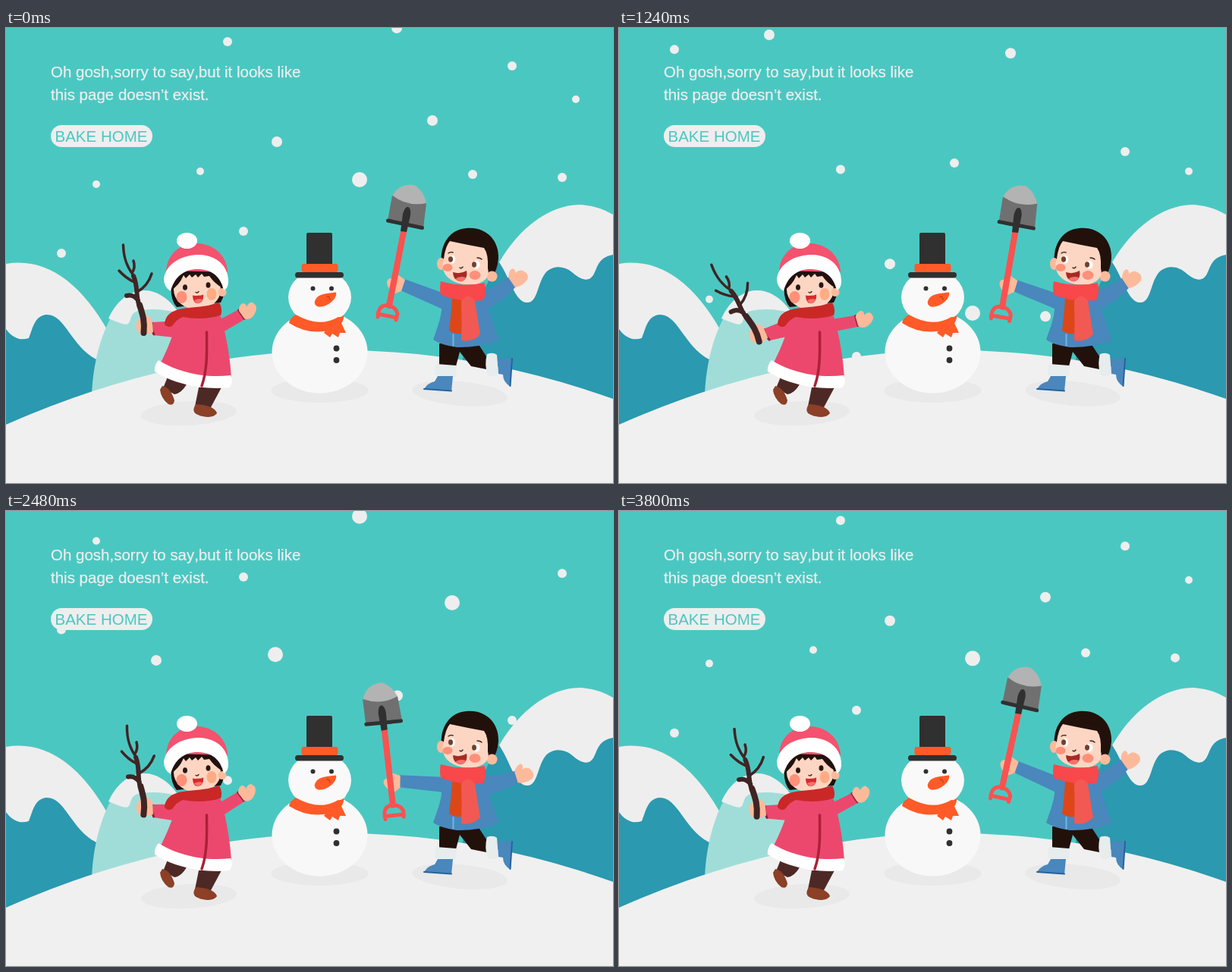
Animation, 800 px wide and 600 px high, one loop 3840 ms. Source, as an HTML page:

```html
<!DOCTYPE html>
<html lang="en">
<head>
<meta charset="utf-8">
<title>Page not found</title>
<style>
html, body { margin: 0; width: 100%; height: 100%; overflow: hidden; background: #4bc7c1; }
svg { display: block; }
text { font: 20.5px "Liberation Sans", Arial, sans-serif; font-kerning: none; fill: #eee; stroke: #eee; stroke-width: .25; }
.line { fill: none; stroke-linecap: round; stroke-linejoin: round; }
.blue { fill: #4987bd; }
.skin { fill: #fdba9b; }
.snow { fill: #eee; }
.coat { fill: #ec486d; }
.dark { fill: #303030; }
.orange { fill: #ff5a27; }
</style>
</head>
<body>
<svg width="800" height="600" viewBox="0 0 800 600">
  <rect width="800" height="600" fill="#4bc7c1"/>
  <g id="flakes" class="snow"></g>

  <g id="hills">
    <path fill="#2b99af" d="M0 385L60 370L119 437V500L0 530ZM650 308L700 300L800 290V500H590Q610 370 650 308Z"/>
    <path class="snow" d="M0 311C52 302 98 335 134 399L119 437C86 420 78 378 54 378C38 379 36 394 30 409C18 413 8 408 0 397Z"/>
    <path class="snow" d="M650 309C677 262 718 233 756 233Q780 234 800 246V299C780 303 780 315 775 324C768 338 755 330 746 322C735 313 720 313 711 323C700 337 701 362 687 362C671 362 665 331 650 309Z"/>
    <path fill="#a0ddd9" d="M113 485C115 415 145 346 182 346C222 346 246 415 251 485Z"/>
    <path class="snow" d="M135 383C146 359 164 346 182 346C200 346 216 358 228 376C208 370 187 370 174 373C161 377 167 388 159 391Q151 390 135 383Z"/>
  </g>
  <path fill="#f0f0f0" d="M0 523Q400 346 800 489V600H0Z"/>
  <g fill="#e9e9e9">
    <ellipse cx="241" cy="508" rx="63" ry="16" transform="rotate(-3 241 508)"/>
    <ellipse cx="413.500" cy="478" rx="64" ry="16"/>
    <ellipse cx="598" cy="482" rx="63" ry="16" transform="rotate(5 598 482)"/>
  </g>

  <g id="snowman">
    <ellipse cx="413.500" cy="427.500" rx="63" ry="54" fill="#f8f8f8"/>
    <ellipse cx="413.500" cy="355" rx="41.500" ry="36" fill="#f9f9f9"/>
    <g class="dark">
      <rect x="396" y="270" width="34" height="45" rx="2"/>
      <rect x="381" y="322" width="64" height="7.500" rx="3.700"/>
      <circle cx="404.500" cy="343.500" r="3"/><circle cx="429" cy="343.500" r="3"/>
      <circle cx="435.500" cy="422.500" r="3.900"/><circle cx="435.500" cy="438" r="3.900"/>
    </g>
    <g class="orange">
      <rect x="389.500" y="311" width="48" height="11" rx="3"/>
      <path d="M408 358C412 350 425 350 435 348.500C437 358 422 369 411 367.500C406 365 406 361 408 358Z"/>
      <path d="M382 378Q373 384 373 389Q401 407 432 397Q446 390 445 379Q440 382 438 381Q413 396 382 378Z"/>
      <path d="M427 391L441 387L448 402L440 402L438 408L430 403L427 408L419 402Z"/>
    </g>
    <path class="line" stroke="#c9431c" stroke-width="1.600" d="M423 354Q427 354 427 358"/>
  </g>

  <g id="girl">
    <path fill="#4d2925" d="M213 460L238 470Q231 482 222 483L207 475ZM254 474H284L269 502L249 499Z"/>
    <path fill="#8b4027" d="M206 472Q217 474 222 491Q221 499 214 496Q204 488 203 477ZM251 496Q275 498 278 508Q273 515 259 512Q243 509 249 498Z"/>
    <g id="branchArm">
      <path class="coat" d="M230 386L192 388Q190 397 194 405L230 409Z"/>
      <path class="line" stroke="#952039" stroke-width="3" d="M192.500 389Q191 397 195 404"/>
      <path class="skin" d="M193 387Q190 380 185 379Q178 380 172 388Q170 396 175 402Q186 406 194 401Z"/>
      <g class="line" stroke="#402424">
        <path stroke-width="3.500" d="M154.500 286C155 305 160 316 168 326M149 320Q158 330 169 335M168 307Q171 316 166 323M192 324Q187 340 173 348"/>
        <path stroke-width="6" d="M168 327C174 340 171 353 175 364M159 353Q168 351 174 359"/>
        <path stroke-width="8" d="M176 365C180 378 183 385 181.500 402"/>
      </g>
    </g>
    <g id="waveArm">
      <path class="coat" d="M279 386L307 371L315 384L286 401Z"/>
      <path class="line" stroke="#952039" stroke-width="3" d="M306.500 372Q311 379 314 383"/>
      <path class="skin" d="M307 373C307 366 311 361 315 364Q317 365 317 368C320 361 325 361 326 363Q332 366 329 374C326 382 320 386 314 383Z"/>
    </g>
    <path class="coat" d="M226 380H283C291 408 296 438 297 464L250 469L200 449C212 426 222 403 226 380Z"/>
    <path fill="#fff" d="M201 438C226 454 262 462 296 458Q300 466 295 474C262 478 222 470 196 453Q195 445 201 438Z"/>
    <path class="line" stroke="#ad2038" stroke-width="3.500" d="M264.500 401C265 430 265 452 258 472"/>
    <path fill="#21110f" d="M218 338Q216 358 225 368L283 362Q290 350 289 326L250 310Z"/>
    <ellipse cx="252" cy="345" rx="31" ry="26" fill="#fdd6c3"/>
    <circle cx="285" cy="348.500" r="5.500" class="skin"/>
    <path fill="#21110f" d="M217 346Q228 340 234 326L237 330L242 325L245 329L250 325L253 329L258 324L261 328L268 327Q274 336 284 342L290 330V312H217Z"/>
    <ellipse cx="231.500" cy="355" rx="7" ry="8" fill="#ff9079"/>
    <ellipse cx="271" cy="351" rx="6.500" ry="8" fill="#ffac85"/>
    <g fill="#2a1714"><ellipse cx="236" cy="342" rx="3" ry="3.800"/><ellipse cx="266.500" cy="339" rx="3" ry="3.800"/></g>
    <path class="line" stroke="#3c211b" stroke-width="1.300" d="M250 348.500Q252 350 254 347.500"/>
    <path fill="#d62b2b" d="M246 352.500Q253 354 260 351.500C261 360 256 364 251 363Q246 361 246 352.500Z"/>
    <path fill="#f4716d" d="M248 359Q254 356 259 358Q256 364 251 363Z"/>
    <path fill="#f4526e" d="M211 320C213 298 228 284 253 284C276 286 291 301 292 322Z"/>
    <ellipse cx="238.500" cy="280.500" rx="13.500" ry="10.500" fill="#fff"/>
    <path fill="#fff" d="M217 347Q208 342 208 330C212 309 233 299 255 299C280 300 294 316 293 336Q292 344 287 346C283 327 270 318 252 318C235 318 222 328 217 347Z"/>
    <path fill="#ca2727" d="M209 391C210 377 220 371 240 369Q263 368 281 362Q286 370 283 379Q258 386 233 381Q225 384 219 393Q213 396 209 391Z"/>
  </g>

  <g id="boy">
    <g id="shovelArm">
      <path class="blue" d="M525 331L583 352L576 371L520 346Z"/>
      <path class="skin" d="M526 332L516 325Q511 325 510 330Q502 329 502 336Q503 345 513 350L521 347Z"/>
      <path class="line" stroke="#fa5250" stroke-width="8" stroke-linecap="butt" d="M525 264L505 366"/>
      <path class="line" stroke="#fa5250" stroke-width="5" d="M490 381L491 374Q494 364 504 366Q514 368 516 377L514 385M490 377L515 382"/>
      <path fill="#707070" d="M509 221L554 231L550 264L503 254Z"/>
      <path fill="#b3b3b3" d="M509.500 221C517 207 530 205 540 208Q551 216 554 231Q529 236 509.500 221Z"/>
      <path class="dark" d="M520 268L523 245Q526 235 530 236Q534 238 533 247L528 269Z"/>
      <path class="line" stroke="#303030" stroke-width="5" d="M503.500 254L548.500 263.500"/>
    </g>
    <g id="freeArm">
      <path class="blue" d="M623 348Q646 342 663 328L672 341Q658 358 634 371Z"/>
      <path class="skin" d="M662 329Q663 318 668 317Q672 319 671 323Q678 317 683 321Q690 325 687 332Q680 341 671 342Z"/>
    </g>
    <path fill="#22110b" d="M571 416H622L633 433V450L613 446L598 427L593 446H571Z"/>
    <path fill="#e7eced" d="M567 443L593 445Q595 452 592 460L566 458Q564 450 567 443ZM634 430Q642 427 647 431L649 456Q642 461 635 458Q630 444 634 430Z"/>
    <path class="blue" d="M569 459H589L587 479L551 476Q556 468 565 466ZM648 436L667 435L665 473Q655 467 655 457L649 456Z"/>
    <path class="line" stroke="#28639b" stroke-width="2" d="M551 476L587 478.500M667 436L664.500 472"/>
    <path class="blue" d="M574 350H631C636 375 643 394 650 412Q620 422 594 421Q573 418 563 411C570 391 577 375 574 350Z"/>
    <path fill="#dd4718" d="M588 356H604L601 403Q590 404 584 399Q587 375 588 356Z"/>
    <path class="line" stroke="#75b5e0" stroke-width="2" d="M589.500 404V419"/>
    <path fill="#22110b" d="M574 312C571 284 586 265 607 264C634 262 650 281 649 304Q648 318 640 330L586 322Z"/>
    <ellipse cx="573.500" cy="311" rx="5.500" ry="8" class="skin"/>
    <circle cx="640.500" cy="327.500" r="7" class="skin"/>
    <path fill="#fdd6c3" d="M577 304Q579 288 585 281Q608 286 630 290Q636 298 635 317Q639 332 620 338Q591 341 579 325Q573 316 577 304Z"/>
    <g fill="#fff"><ellipse cx="588" cy="305" rx="4" ry="5.500"/><ellipse cx="620" cy="312" rx="4.500" ry="5.500"/></g>
    <g fill="#704030"><ellipse cx="586" cy="305" rx="3" ry="3.700"/><ellipse cx="617" cy="312" rx="3" ry="3.700"/></g>
    <g fill="#ff9079"><ellipse cx="582" cy="316" rx="6.500" ry="5"/><ellipse cx="618" cy="326" rx="7.500" ry="6"/></g>
    <path class="line" stroke="#3c211b" stroke-width="1.400" d="M583 297Q586 295 589 296M621 303Q625 303 627 305M598 316Q600 318 602 315"/>
    <path fill="#a52b24" d="M589 322Q599 325 607 320C609 329 604 335 597 334Q589 331 589 322Z"/>
    <path fill="#f4716d" d="M592 331Q598 326 606 329Q603 336 597 334Z"/>
    <path fill="#f8484b" d="M573 334Q601 342 631 336Q634 349 629 359Q598 362 573 352Q571 342 573 334Z"/>
    <path fill="#f25953" d="M600 360Q609 347 618 360L625 404Q615 415 600 412Q601 385 600 360Z"/>
  </g>

  <text x="59" y="65">Oh gosh,sorry to say,but it looks like</text>
  <text x="59" y="95">this page doesn’t exist.</text>
  <rect class="snow" x="59" y="128" width="134" height="29" rx="14.500"/>
  <text x="64.500" y="150" style="fill:#4bc7c1;stroke:none">BAKE HOME</text>
</svg>
<script>
const LOOP = 3840, STEP = 40, SWING = 1920, ABOVE = 12;

// Radius: flakes as [x, y at the start of the loop, pixels fallen per loop]
const flakes = {
  5: [[119, 206, 470], [256, 189, 550], [751, 94, 294]],
  6: [[73, 297, 397], [292, 18, 522], [313, 268, 511], [442, -18, 607],
      [615, 193, 580], [667, 50, 350], [733, 197, 324]],
  7: [[198, 403, 582], [357, 150, 499], [515, 0, 712], [516, 474, 651], [562, 122, 800]],
  10: [[355, 468, 787], [466, 200, 545], [588, 291, 480]]
};

const byId = id => document.getElementById(id);

const dots = Object.entries(flakes).flatMap(([r, list]) => list.map(([x, y, fall]) => {
  const node = document.createElementNS("http://www.w3.org/2000/svg", "circle");
  node.setAttribute("r", r);
  node.setAttribute("cx", x);
  byId("flakes").append(node);
  return { node, y, fall };
}));

// Linear to and fro between 10 and -20 degrees
function swing(t, peak) {
  const u = ((t - peak + SWING) % SWING) / SWING;
  return 10 - 30 * (1 - Math.abs(1 - 2 * u));
}

function rotate(id, angle, x, y) {
  byId(id).setAttribute("transform", `rotate(${angle} ${x} ${y})`);
}

function draw(now) {
  const t = Math.floor(now % LOOP / STEP) * STEP;
  for (const { node, y, fall } of dots) {
    node.setAttribute("cy", (y + ABOVE + fall * (1 + t / LOOP)) % fall - ABOVE);
  }
  const boy = swing(t, 1600), girl = swing(t, 320);
  rotate("shovelArm", boy, 578, 361);
  rotate("freeArm", -boy, 620, 362);
  rotate("branchArm", girl, 218, 398);
  rotate("waveArm", -girl, 286, 391);
}

const start = performance.now();
function frame() {
  draw(performance.now() - start);
  requestAnimationFrame(frame);
}
frame();
</script>
</body>
</html>
```
